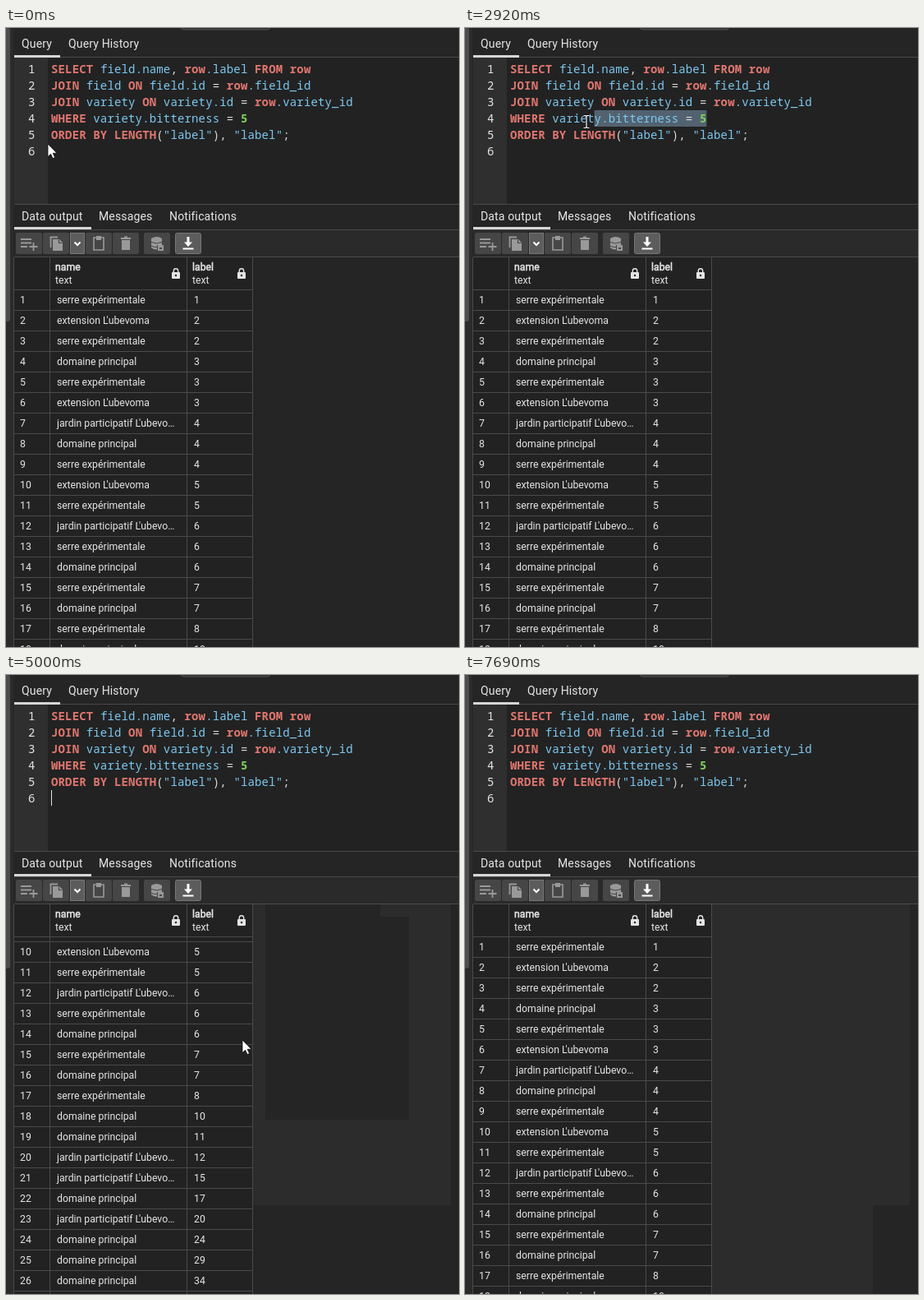
Write an HTML page that moves like this. It is 552 by 753 pixels and loops after 8160 ms.

```html
<!DOCTYPE html>
<html lang="fr">
<head>
<meta charset="utf-8">
<title>Query tool</title>
<style>
  html, body { margin: 0; width: 100%; height: 100%; overflow: hidden; background: #252525; }
  svg { display: block; position: absolute; left: 0; top: 0; }
  text { white-space: pre; fill: #e6e6e6; }
  .ui { font: 14px Roboto, sans-serif; letter-spacing: .15px; }
  .cell, .head { font: 12.25px Roboto, sans-serif; }
  .head { stroke: #e6e6e6; stroke-width: .5px; }
  .code { font: 14px "Noto Sans Mono", monospace; letter-spacing: .15px; }
  .kw { fill: #e0766f; font-weight: bold; }
  .num { fill: #7fcc5c; font-weight: bold; }
  .id { fill: #7dc9f1; }
  .op { fill: #d8d8d8; }
</style>
</head>
<body>
<svg id="stage" width="552" height="753" viewBox="0 0 552 753">
  <defs><clipPath id="body"><rect x="9" y="319" width="293" height="434"/></clipPath></defs>
</svg>
<script>
const LOOP = 8160, TICK = 130, BLINK = 530;
const CHAR = 8.55, LEFT = 55, ROW = 25;
const LINE = '#4a4a4a', GREY = '#999', BUTTON = '#464646', WHITE = '#fff';
const stage = document.getElementById('stage');

function add(tag, attrs, parent = stage, text) {
  const el = document.createElementNS('http://www.w3.org/2000/svg', tag);
  for (const k in attrs) el.setAttribute(k, attrs[k]);
  if (text !== undefined) el.textContent = text;
  parent.appendChild(el);
  return el;
}
const rect = (x, y, width, height, fill, more, parent) =>
  add('rect', { x, y, width, height, fill, ...more }, parent);
const label = (x, y, cls, text, parent) => add('text', { x, y, class: cls }, parent, text);
const path = (d, stroke, width = 1.5, fill = 'none', parent) =>
  add('path', { d, stroke, 'stroke-width': width, fill }, parent);
const solid = (d, fill) => path(d, 'none', 0, fill);
const show = (el, on) => el.setAttribute('visibility', on ? 'visible' : 'hidden');

// Panels
rect(0, 0, 9, 753, '#2b2b2b');
rect(-4, 0, 9, 357, '#4d4d4d', { rx: 3 });
rect(213.5, -6, 108, 8, '#303030', { rx: 3, stroke: '#555' });
rect(10, 36, 41, 178, '#2f2f2f');
rect(51, 36, 501, 178, '#222');
rect(10, 246, 542, 32, '#2a2a2a');
for (const y of [35, 214, 245, 278]) rect(10, y, 542, 1, LINE);

const panel = rect(301, 279, 241, 366, '#2c2c2c');
const shade = solid('M316 279H456V294H491V541H316Z', '#252525');
const tail = rect(301, 645, 196, 108, '#2c2c2c');

// Tabs
label(19, 24, 'ui', 'Query');
label(76, 24, 'ui', 'Query History');
label(19, 234, 'ui', 'Data output');
label(113, 234, 'ui', 'Messages');
label(199, 234, 'ui', 'Notifications');
rect(10, 33, 56, 3, '#d6d6d6');
rect(10, 242, 94, 3, '#d6d6d6');

// Toolbar
for (const x of [12, 45, 97, 130, 168]) rect(x, 249, 32, 26, BUTTON, { rx: 2 });
rect(78.5, 249.5, 17, 25, '#5c5c5c', { stroke: '#777' });
rect(206.5, 249.5, 31, 25, '#5c5c5c', { rx: 2, stroke: '#777' });
path('M18 257H31M18 261.5H31M18 266H26M33.5 261V271M28.5 266H38.5', GREY, 1.8);
path('M54.5 267V254.5H63', GREY, 1.8);
solid('M57 257H65L69 261V271H57Z', GREY);
path('M64.5 257.5V261.5H68.5', BUTTON, 1.2);
path('M83.5 260.5L87 264L90.5 260.5', WHITE, 2);
path('M107 255H119V270H107Z', GREY, 1.6);
solid('M110 253H116V258H110Z', GREY);
solid('M141 258H151V270H141Z', GREY);
path('M140 256H152M144 254.5H148', GREY, 1.8);
solid('M177 256Q183.5 252 190 256V264H184V269.5Q180 270 177 267Z', GREY);
path('M177 260.5Q183 263.5 190 260.5M177 265Q180 267 184 266.5', BUTTON, 1);
rect(185, 264, 7, 7, GREY);
rect(187, 267, 3, 2, BUTTON);
path('M222 254V262', WHITE, 3);
solid('M217 260.5H227L222 266Z', WHITE);
path('M215.5 268.5H228.5', WHITE, 2);

// Editor
const marks = rect(0, 0, 0, 20, '#536270');
const QUERY = [
  'SELECT field.name, row.label FROM row',
  'JOIN field ON field.id = row.field_id',
  'JOIN variety ON variety.id = row.variety_id',
  'WHERE variety.bitterness = 5',
  'ORDER BY LENGTH("label"), "label";',
  ''
];
const KEYWORD = /^(SELECT|FROM|JOIN|ON|WHERE|ORDER|BY|LENGTH|row)$/;
const kind = s => KEYWORD.test(s) ? 'kw' : /^\d+$/.test(s) ? 'num' : /^["\w.]/.test(s) ? 'id' : 'op';
QUERY.forEach((line, i) => {
  const y = 55 + 20 * i;
  label(27, y, 'code', i + 1);
  const el = label(LEFT, y, 'code', '');
  for (const s of line.match(/"\w+"|\w+|\.|[^\w."]+/g) || []) add('tspan', { class: kind(s) }, el, s);
});
const caret = rect(LEFT, 140, 1, 19, '#e0e0e0');

// Result grid: each entry is a place initial and a label
const NAMES = {
  s: 'serre expérimentale', e: "extension L'ubevoma",
  d: 'domaine principal', j: "jardin participatif L'ubevo…"
};
const RESULT = 's1 e2 s2 d3 s3 e3 j4 d4 s4 e5 s5 j6 s6 d6 s7 d7 s8 ' +
  'd10 d11 j12 j15 d17 j20 d24 d29 d34 d36 d37';
rect(10, 279, 290, 474, '#222');
const rows = add('g', {}, add('g', { 'clip-path': 'url(#body)' }));
RESULT.split(' ').forEach((item, i) => {
  const y = 335 + ROW * i;
  label(17, y, 'cell', i + 1, rows);
  label(62, y, 'cell', NAMES[item[0]], rows);
  label(229, y, 'cell', item.slice(1), rows);
  rect(10, y + 8, 290, 1, LINE, {}, rows);
});
for (const x of [9, 53, 220, 300]) rect(x, 279, 1, 474, LINE);
rect(10, 318, 291, 1, LINE);
for (const [x, name, lock] of [[60, 'name', 207], [227, 'label', 287]]) {
  label(x, 295, 'head', name);
  label(x, 311, 'cell', 'text');
  rect(lock - 5, 297, 10, 8, '#e4e4e4', { rx: 1 });
  path(`M${lock - 2.7} 297.5V295.5a2.7 2.7 0 0 1 5.4 0V297.5`, '#e4e4e4', 1.4);
  add('circle', { cx: lock, cy: 301, r: 1.2, fill: '#222' });
}

// Pointers
const arrow = path('M0 0V15.6L3.6 12.3L6 17.6L8.6 16.5L6.2 11.3H11Z', '#111', .8, WHITE);
const beam = add('g', {});
const BEAM = 'M-3.5 -7.5H-1L0 -6.5L1 -7.5H3.5M0 -6.5V6.5M-3.5 7.5H-1L0 6.5L1 7.5H3.5';
path(BEAM, '#111', 2.6, 'none', beam);
path(BEAM, WHITE, 1.2, 'none', beam);

// Key points, joined by eased moves: time, then values
const POINTER = [
  [0, 51, 141], [250, 56, 133], [520, 56, 133], [1260, 386, 131],
  [2080, 386, 131], [2470, 297, 115], [3124, 119, 114],
  [3380, 119, 114], [3880, 445, 168], [4420, 288, 444],
  [5590, 288, 444], [6110, 289, 581], [7070, 289, 581], [7600, 500, 790]
];
const SCROLL = [[4720, 0], [5070, 254], [6420, 254], [6630, 0]];
const DRAGS = [
  { from: 520, to: 1560, line: 4, anchor: 0 },
  { from: 2470, to: 3380, line: 3, anchor: 28 }
];

function follow(keys, t) {
  const next = keys.findIndex(k => k[0] > t);
  if (next < 1) return keys.at(next).slice(1);
  const [t0, ...a] = keys[next - 1], [t1, ...b] = keys[next];
  const eased = 1 - (1 - (t - t0) / (t1 - t0)) ** 2;
  return a.map((v, i) => v + (b[i] - v) * eased);
}

function drawSelection(t) {
  const drag = DRAGS.find(d => t >= d.from && t < d.to);
  show(marks, drag);
  if (!drag) return;
  // The highlight trails slightly behind the pointer
  const [x] = follow(POINTER, t - 35);
  const head = Math.min(QUERY[drag.line].length, Math.ceil((x - LEFT) / CHAR));
  marks.setAttribute('x', LEFT + Math.min(head, drag.anchor) * CHAR);
  marks.setAttribute('y', 40 + 20 * drag.line);
  marks.setAttribute('width', Math.abs(head - drag.anchor) * CHAR);
}

function draw(time) {
  const t = Math.floor((time + 40) / TICK) * TICK; // screen refreshes in ticks
  const [x, y] = follow(POINTER, t);
  const overText = t > 0 && y < 214;
  for (const el of [arrow, beam]) el.setAttribute('transform', `translate(${Math.round(x)} ${Math.round(y)})`);
  show(arrow, !overText);
  show(beam, overText);
  drawSelection(t);

  rows.setAttribute('transform', `translate(0 ${-Math.round(follow(SCROLL, t)[0])})`);
  show(caret, time >= 3940 && Math.floor((time - 3940) / BLINK) % 2 === 0);
  show(panel, t >= 4290);
  show(shade, t >= 4290 && t < 7540);
  show(tail, t >= 7670);
}

const start = performance.now();
function tick(now) {
  draw(Math.max(0, now - start) % LOOP);
  requestAnimationFrame(tick);
}
draw(0);
requestAnimationFrame(tick);
</script>
</body>
</html>
```
